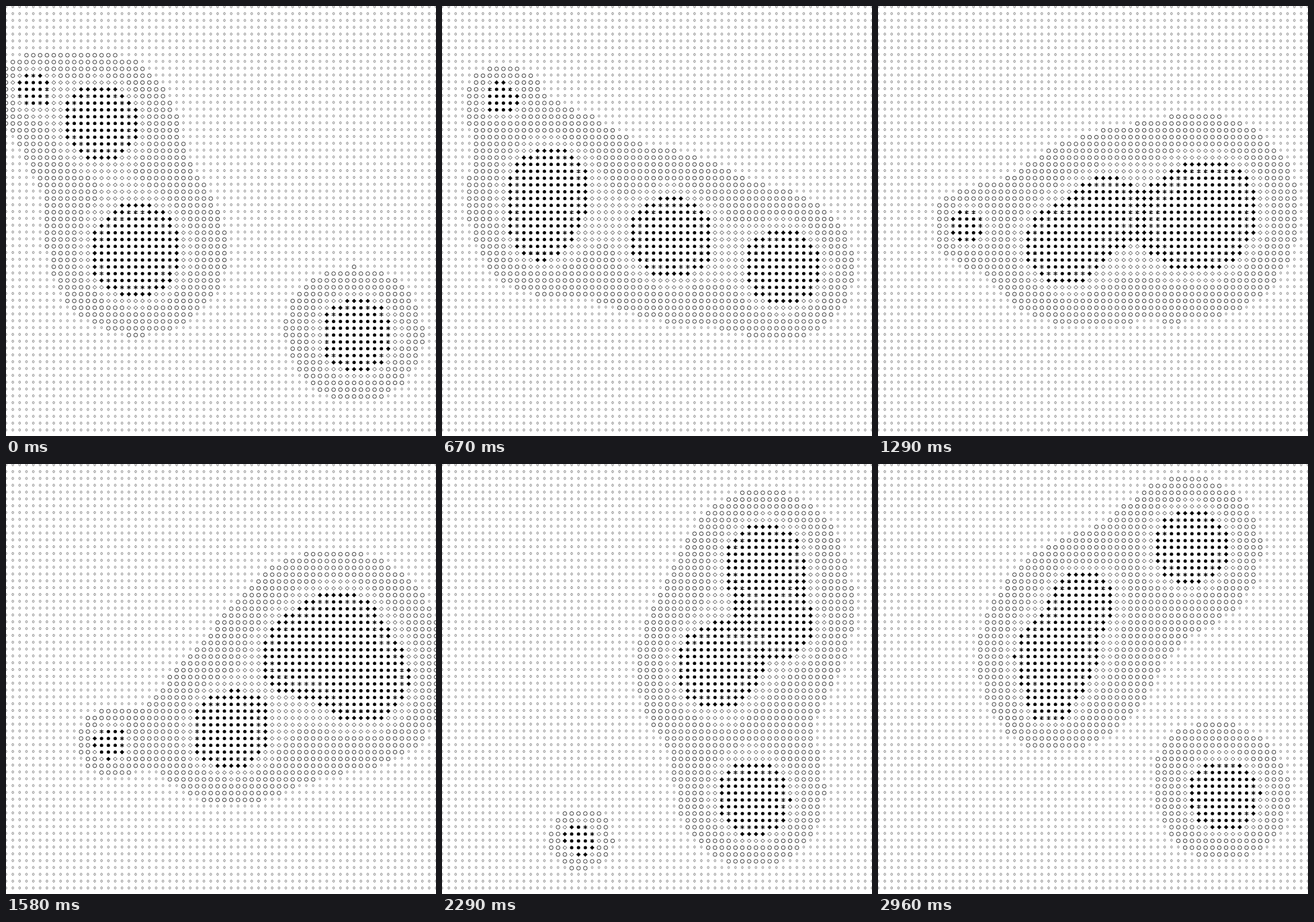
An HTML page with a canvas for the animation above (3000 ms loop, 640 px wide and 640 px high).

```html
<!DOCTYPE html>
<html>
<head>
<meta charset="utf-8">
<style>
html, body { margin: 0; width: 100%; height: 100%; overflow: hidden; background: #fff; }
canvas { display: block; }
</style>
</head>
<body>
<canvas id="c" width="640" height="640"></canvas>
<script>
const ctx = document.getElementById('c').getContext('2d');
const SIZE = 640, CELLS = 63, STEP = SIZE / CELLS, LIFT = 8;
const LOOP = 3000, FPS = 24;
const OVERSHOOT = 2; // how far a ball dips into the wall

// position in px, velocity in px per second
const balls = [
  { r: 40, x: 39, y: 133, vx: 72.5, vy: -303 },
  { r: 90, x: 141, y: 181, vx: -187, vy: 142.5 },
  { r: 62, x: 181, y: 383, vx: -309.7, vy: -58.5 },
  { r: 95, x: 199, y: 370, vx: 213.3, vy: -26 },
  { r: 93, x: 523, y: 498, vx: -19, vy: -150.6 }
];

// straight travel folded between two walls
function bounce(p, lo) {
  const span = SIZE - 2 * lo;
  const m = (((p - lo) % (2 * span)) + 2 * span) % (2 * span);
  return lo + (m > span ? 2 * span - m : m);
}

function ring(x, y, rx, ry, color, width) {
  ctx.beginPath();
  ctx.ellipse(x, y, rx, ry, 0, 0, Math.PI * 2);
  ctx.strokeStyle = color;
  ctx.lineWidth = width;
  ctx.stroke();
}

function diamond(x, y, r) {
  ctx.beginPath();
  ctx.moveTo(x, y - r);
  ctx.lineTo(x + r, y);
  ctx.lineTo(x, y + r);
  ctx.lineTo(x - r, y);
  ctx.closePath();
}

function star(x, y) {
  ctx.beginPath();
  for (let i = 0; i < 3; i++) {
    const a = Math.PI * (0.5 + i / 3), dx = 3 * Math.cos(a), dy = 3 * Math.sin(a);
    ctx.moveTo(x - dx, y - dy);
    ctx.lineTo(x + dx, y + dy);
  }
  ctx.strokeStyle = '#000';
  ctx.lineWidth = 1.2;
  ctx.stroke();
}

// one mark per whole step of field strength
const marks = [
  (x, y) => ring(x, y - 1, 1.3, 1.7, '#444', 0.6),
  (x, y) => ring(x, y, 2.8, 2.8, '#000', 0.75),
  (x, y) => {
    diamond(x, y, 2.8);
    ctx.strokeStyle = '#000';
    ctx.lineWidth = 0.7;
    ctx.stroke();
  },
  (x, y) => { diamond(x, y, 3.3); ctx.fill(); },
  star,
  (x, y) => {
    ctx.beginPath();
    ctx.arc(x, y, 2.5, 0, Math.PI * 2);
    ctx.fill();
  }
];

function draw(ms) {
  const tick = Math.floor((Math.floor(ms / 10) * 10 + 4.9) * FPS / 1000);
  const t = tick / FPS;
  const now = balls.map(b => ({
    x: bounce(b.x + b.vx * t, b.r - OVERSHOOT),
    y: bounce(b.y + b.vy * t, b.r - OVERSHOOT),
    q: b.r * b.r
  }));
  ctx.fillStyle = '#fff';
  ctx.fillRect(0, 0, SIZE, SIZE);
  ctx.fillStyle = '#000';
  for (let j = 0; j <= CELLS; j++) {
    for (let i = 0; i <= CELLS; i++) {
      const x = i * STEP, y = j * STEP;
      let sum = 0;
      for (const b of now) sum += b.q / ((x - b.x) ** 2 + (y - b.y) ** 2 + 1e-6);
      marks[Math.min(5, Math.floor(sum))](x, y - LIFT);
    }
  }
}

const start = performance.now();
function loop() {
  draw((performance.now() - start) % LOOP);
  requestAnimationFrame(loop);
}
draw(0);
requestAnimationFrame(loop);
</script>
</body>
</html>
```
